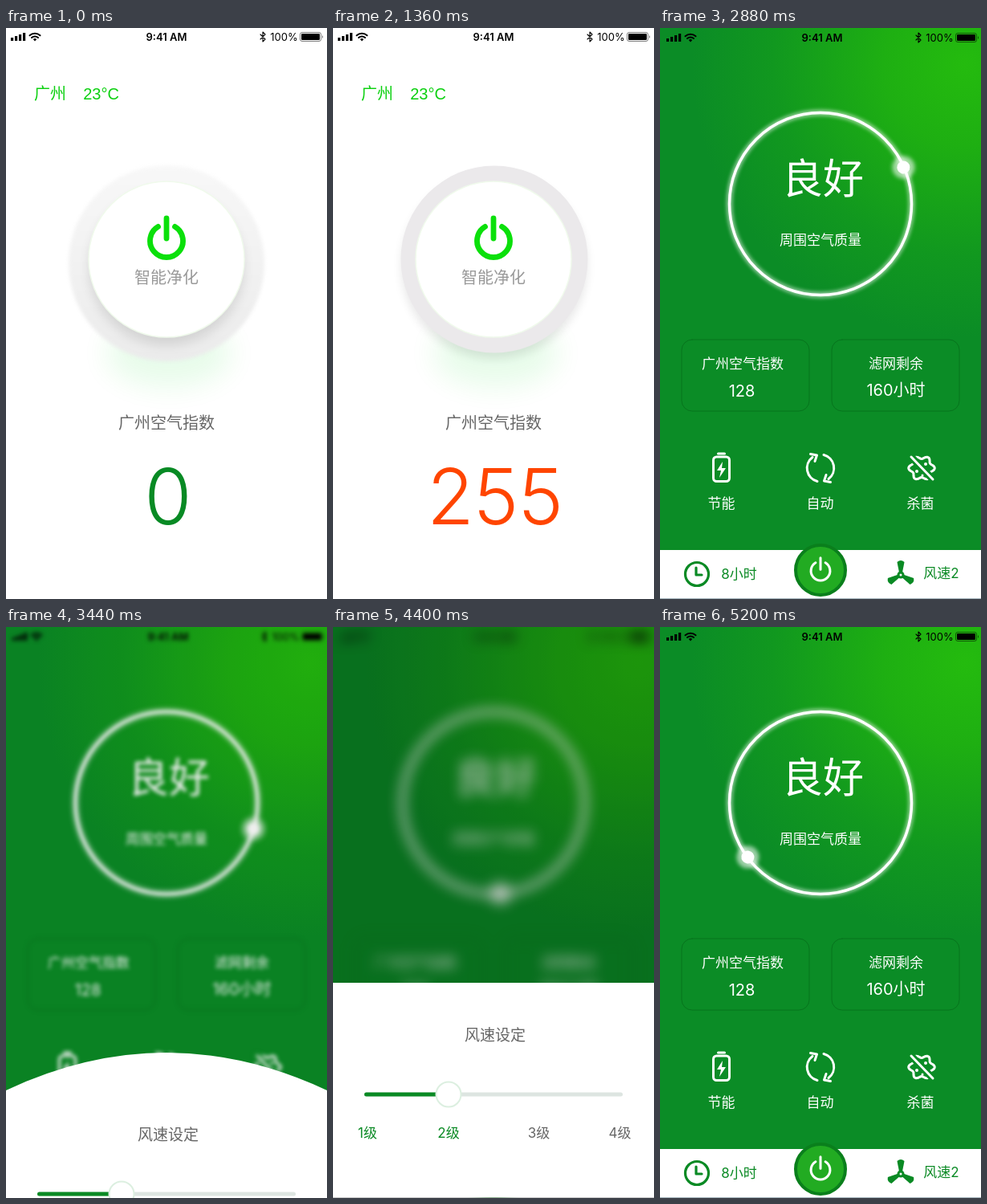
An HTML page that plays this animation: 400 by 711 pixels, repeating every 5.24 s.

```html
<!DOCTYPE html>
<html lang="zh-CN">
<head>
<meta charset="utf-8">
<title>空气净化</title>
<style>
  html, body { margin: 0; height: 100%; overflow: hidden; background: #fff; }
  svg { display: block; width: 100%; height: 100%; }
  text { font: 17px Inter, "Noto Sans CJK SC", sans-serif; text-anchor: middle; }
  .line { fill: none; stroke-linecap: round; stroke-linejoin: round; }
  .white { stroke: #fff; stroke-width: 3; }
  .gray { fill: #666; }
  .f20 { font-size: 20px; }
  .f19 { font-size: 19px; }
</style>
</head>
<body>
<svg viewBox="0 0 400 711">
  <defs>
    <radialGradient id="sky" gradientUnits="userSpaceOnUse" cx="380" cy="45" r="340">
      <stop offset="0" stop-color="#24bb0e"/>
      <stop offset=".3" stop-color="#1eaf12"/>
      <stop offset=".7" stop-color="#11981f"/>
      <stop offset="1" stop-color="#0b8c26"/>
    </radialGradient>
    <linearGradient id="rim" x2="0" y2="1">
      <stop offset="0" stop-color="#f8f8f8"/>
      <stop offset="1" stop-color="#ebebeb"/>
    </linearGradient>
    <g id="status">
      <path d="M6 12h3.2v4h-3.2zM11 10h3.2v6h-3.2zM16 8h3.2v8h-3.2zM21 6h3.2v10h-3.2z"/>
      <path class="line" stroke="#000" stroke-width="2" d="M29.5 9.3a9.4 9.4 0 0 1 13 0M32 12a5.8 5.8 0 0 1 8 0"/>
      <path d="M33.8 13.9L36 16.4l2.2-2.5a3.4 3.4 0 0 0-4.4 0z"/>
      <text x="200" y="15.5" style="font-size:13px;font-weight:600">9:41 AM</text>
      <path class="line" stroke="#000" stroke-width="1.1" d="M317 8l6 6-3 3V5l3 3-6 6"/>
      <text x="346.5" y="15.5" style="font-size:13px">100%</text>
      <rect x="366.5" y="5.5" width="26" height="11" rx="2.5" fill="none" stroke="#000" stroke-opacity=".5"/>
      <rect x="368" y="7" width="23" height="8" rx="1.2"/>
      <path d="M394 9q2 2 0 4z" fill-opacity=".6"/>
    </g>
    <g id="power" class="line">
      <path d="M-10.5-17.6A20.5 20.5 0 1 0 10.5-17.6M0-28V-3"/>
    </g>
  </defs>

  <g id="home">
    <rect width="400" height="711" fill="#fff"/>
    <use href="#status"/>
    <text x="55" y="89" class="f20" fill="#0bd00f">广州</text>
    <text x="118.500" y="89" fill="#0bd00f" style="font:20px 'Liberation Sans',Arial,sans-serif">23°C</text>
    <ellipse cx="203" cy="405" rx="78" ry="42" fill="#0d2" opacity=".09" style="filter:blur(17px)"/>
    <g id="softRim">
      <circle cx="200" cy="293" r="122" fill="url(#rim)" style="filter:blur(2px)"/>
      <circle cx="200" cy="298" r="97" fill="#000" opacity=".1" style="filter:blur(7px)"/>
    </g>
    <g id="hardRim">
      <circle cx="201" cy="296" r="116" fill="#000" opacity=".09" style="filter:blur(6px)"/>
      <circle cx="201" cy="288" r="116.500" fill="#ebe9eb"/>
    </g>
    <circle cx="200" cy="288" r="97" fill="#fff" stroke="#f0faec" stroke-width="1.5"/>
    <use href="#power" x="200" y="265" stroke="#0be00b" stroke-width="6.800"/>
    <text x="200" y="318" class="f20" fill="#999">智能净化</text>
    <text x="200" y="499" class="f20 gray">广州空气指数</text>
    <text id="count" x="202" y="618" style="font-size:96px;font-weight:300"></text>
  </g>

  <g id="main">
    <rect width="400" height="711" fill="url(#sky)"/>
    <g id="content" fill="#fff">
      <use href="#status" x="2" y="1" fill="#000"/>
      <circle cx="200" cy="219" r="113.500" class="line" stroke="#fff" stroke-width="8" opacity=".5" style="filter:blur(2px)"/>
      <circle cx="200" cy="219" r="113.500" class="line" stroke="#fff" stroke-width="3.500"/>
      <g id="dot">
        <circle cx="200" cy="106" r="14" opacity=".6" style="filter:blur(2.5px)"/>
        <circle cx="200" cy="106" r="8"/>
      </g>
      <text id="grade" x="203" y="206" style="font-size:51px;font-weight:300">良好</text>
      <text x="200" y="270">周围空气质量</text>
      <g id="cards">
        <g class="line" stroke="#07741d">
          <rect x="27" y="388" width="159" height="89" rx="13"/>
          <rect x="214" y="388" width="159" height="89" rx="13"/>
        </g>
        <text x="103" y="424">广州空气指数</text>
        <text x="102" y="459" class="f20">128</text>
        <text x="294" y="424">滤网剩余</text>
        <text x="294" y="458" class="f20">160小时</text>
      </g>
      <g class="line white">
        <rect x="66.500" y="534" width="20" height="30.500" rx="4"/>
        <path d="M72.500 530h8"/>
        <g id="arrow">
          <path d="M196 564.500A17 17 0 0 1 190 534.500M187.500 530.500l8 1.500-2.500 7.500"/>
        </g>
        <use href="#arrow" transform="rotate(180 200 548)"/>
        <path id="germ"/>
        <path d="M313 534l27 28" stroke="#0b8c26" stroke-width="9"/>
        <path d="M313 534l27 28"/>
      </g>
      <path d="M78 540l-7 11h5l-2 9 8-12h-5z"/>
      <circle cx="331" cy="543" r="2"/><circle cx="320" cy="552" r="2"/><circle cx="327" cy="557" r="1.500"/>
      <text x="76.500" y="598">节能</text>
      <text x="199.500" y="598">自动</text>
      <text x="324.500" y="598">杀菌</text>

      <g id="bar" fill="#0a8a24">
        <rect x="-30" y="650" width="460" height="110" fill="#fff"/>
        <path d="M0 710.500h400" stroke="#a5b5bd"/>
        <g class="line" stroke="#0a8a24" stroke-width="3.200">
          <circle cx="46" cy="680" r="14.500"/>
          <path d="M45 672v9h7"/>
        </g>
        <text x="98.500" y="686">8小时</text>
        <circle cx="200" cy="675" r="31" fill="#22ab22" stroke="#0a7f1c" stroke-width="4"/>
        <use href="#power" transform="translate(200 676) scale(.58)" stroke="#fff" stroke-width="5.200"/>
        <g id="fan">
          <path id="blade" d="M298 678L295.500 665Q300 661 304.500 665L302 678z"/>
          <use href="#blade" transform="rotate(120 300 681)"/>
          <use href="#blade" transform="rotate(240 300 681)"/>
          <circle cx="300" cy="681" r="4.500"/>
          <circle cx="300" cy="681" r="1.500" fill="#fff"/>
        </g>
        <text x="350.500" y="685">风速2</text>
      </g>
    </g>
    <rect id="shade" width="400" height="711"/>
    <path id="sheet" fill="#fff"/>
    <g id="settings" class="gray">
      <text x="202" y="515" class="f19">风速设定</text>
      <g class="line" stroke-width="5">
        <path d="M41.500 582h317" stroke="#dde5e1"/>
        <path d="M41.500 582h102" stroke="#0a8a24"/>
      </g>
      <circle cx="144" cy="582" r="15.500" fill="#fff" stroke="#dcefe0" stroke-width="2"/>
      <text x="43" y="636" fill="#0a8a24">1级</text>
      <text x="144" y="636" fill="#0a8a24">2级</text>
      <text x="256.500" y="636">3级</text>
      <text x="357.500" y="636">4级</text>
    </g>
  </g>
</svg>
<script>
const LOOP = 5240, STEP = 40;
const $ = id => document.getElementById(id);
const set = (id, name, value) => $(id).setAttribute(name, value);
const shift = (id, y) => set(id, 'transform', `translate(0 ${y})`);
const ramp = (t, a, b) => Math.min(1, Math.max(0, (t - a) / (b - a)));
const smooth = p => p * p * (3 - 2 * p);
const bump = p => Math.sin(Math.PI * p);
const GREEN = [8, 138, 36], ORANGE = [255, 69, 0];

// Wavy outline of the germ icon
const outline = Array.from({ length: 72 }, (_, i) => {
  const a = i * Math.PI / 36, r = 13.5 + 2 * Math.cos(6 * a);
  return `${(326 + r * 1.05 * Math.cos(a)).toFixed(1)} ${(548 + r * Math.sin(a)).toFixed(1)}`;
});
set('germ', 'd', `M${outline.join('L')}Z`);

function draw(t) {
  const counted = ramp(t, 0, 1000);
  const rgb = GREEN.map((c, i) => Math.round(c + (ORANGE[i] - c) * counted));
  $('count').textContent = Math.round(255 * counted);
  set('count', 'fill', `rgb(${rgb})`);
  const press = ramp(t, 0, 1360);
  set('softRim', 'opacity', 1 - press);
  set('hardRim', 'opacity', press);

  set('main', 'opacity', smooth(ramp(t, 1920, 2200)));
  set('dot', 'transform', `rotate(${(t - 1960) * 0.072} 200 219)`);
  const reveal = ramp(t, 2160, 2400);
  set('grade', 'opacity', reveal);
  set('cards', 'opacity', reveal);
  shift('cards', 23 * (1 - reveal));
  shift('bar', 70 * (1 - smooth(ramp(t, 2130, 2630))));

  const opening = ramp(t, 3230, 3630), closing = ramp(t, 4430, 4830);
  const offset = 268 * (1 - smooth(opening) + smooth(closing));
  const edge = 443 + offset + 10 * bump(opening);
  const middle = 443 + offset - 37 * bump(opening) + 33 * bump(closing);
  set('sheet', 'd', `M0 ${edge}Q200 ${2 * middle - edge} 400 ${edge}V${710 + offset}H0Z`);
  shift('settings', offset);

  const haze = ramp(t, 3240, 3840) - ramp(t, 4430, 4880);
  $('content').style.filter = haze > 0 ? `blur(${8 * haze}px)` : 'none';
  set('shade', 'opacity', 0.2 * haze);
}

const start = performance.now();
function tick() {
  const t = (performance.now() - start) % LOOP;
  draw(Math.floor(t / STEP) * STEP);
  requestAnimationFrame(tick);
}
tick();
</script>
</body>
</html>
```
